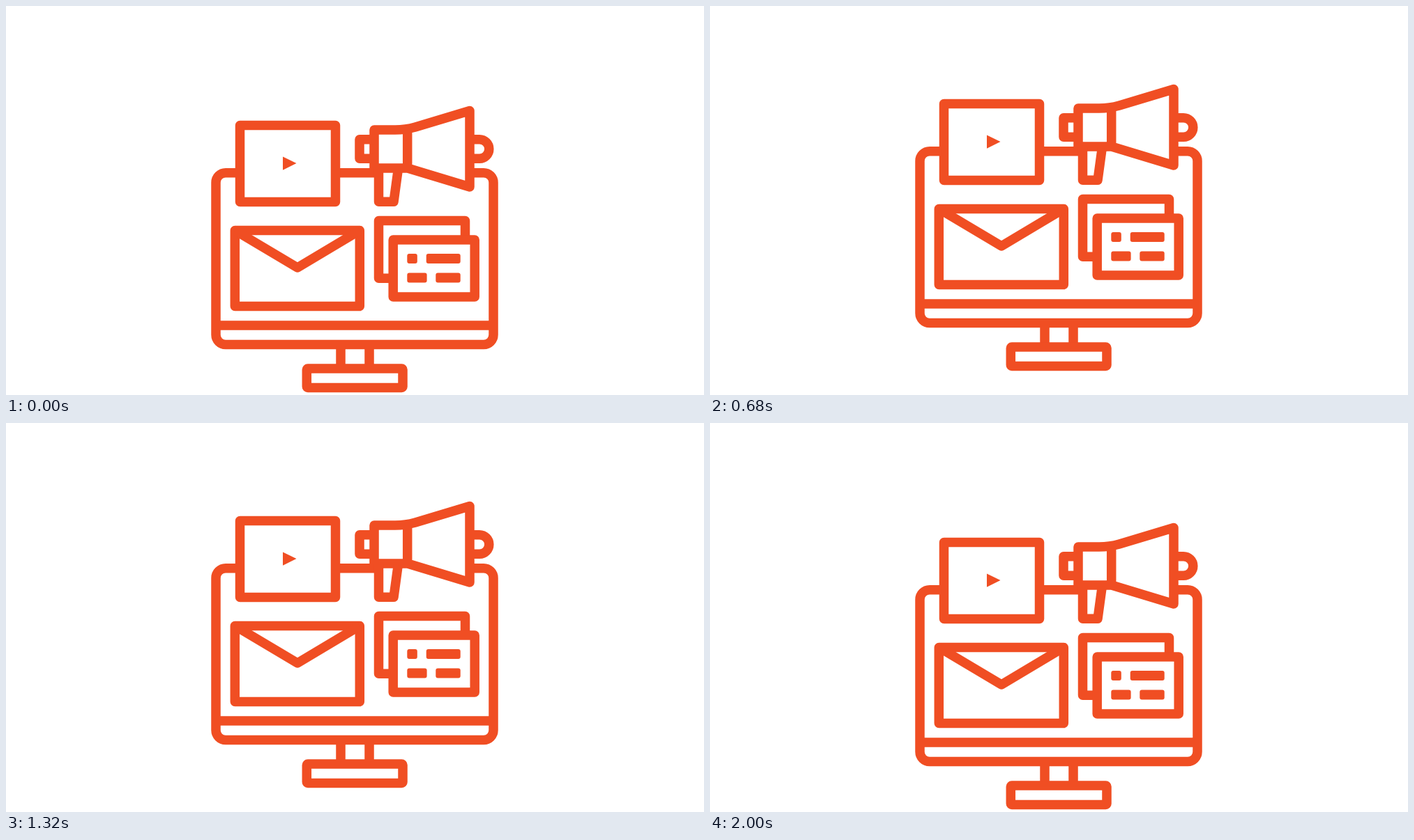
An HTML page that plays this animation: 1001x559 px, repeating every 2040 ms.

```html
<!DOCTYPE html>
<html lang="en">
<head>
<meta charset="utf-8">
<title>Online marketing</title>
<style>
  html, body { margin: 0; width: 100%; height: 100%; overflow: hidden; background: #fff; }
  svg { display: block; width: 1001px; height: 559px; }
  #icon { fill: none; stroke: #f04e23; stroke-width: 13.5; stroke-linejoin: round; }
  .solid { fill: #f04e23; stroke: none; }
</style>
</head>
<body>
<svg viewBox="0 0 1001 559">
  <g id="icon">
    <!-- monitor and stand -->
    <path d="M670 239.7H685a14 14 0 0 1 14 14V472.5a14 14 0 0 1 -14 14H315a14 14 0 0 1 -14 -14V253.7a14 14 0 0 1 14 -14H333M475 239.7H534M301 459H699"/>
    <path d="M480 488V520M521 488V520"/>
    <rect x="431.3" y="521" width="137.7" height="27.5" rx="1.5"/>

    <!-- video -->
    <rect x="335.5" y="171.5" width="137" height="110"/>
    <path class="solid" d="M397 216.5L416.5 226L397 235.7Z"/>

    <!-- megaphone -->
    <path d="M528 178H558Q573 178 587 174L665 150.5V260L576 233H528ZM575.7 177V233"/>
    <path d="M528 191.7H507V219.3H528M668 191.7H679a13.8 13.8 0 0 1 0 27.6H668"/>
    <path d="M534.5 234V281.3H556L562.3 235"/>

    <!-- envelope -->
    <rect x="328.3" y="322.5" width="179" height="109"/>
    <path d="M328.3 322.5L418 376L507.3 322.5"/>

    <!-- cards -->
    <path d="M553 391.3H534.5V308.5H658.5V334"/>
    <rect x="555.2" y="336" width="117" height="82"/>
    <g class="solid">
      <rect x="575.3" y="356" width="14.5" height="14" rx="3"/>
      <rect x="602.7" y="356" width="49" height="14" rx="3"/>
      <rect x="575.3" y="383.5" width="28.3" height="14" rx="3"/>
      <rect x="616.3" y="383.5" width="35.4" height="14" rx="3"/>
    </g>
  </g>
</svg>
<script>
  const LOOP = 2040, STEP = 40, HALF = 1000, RISE = 46;
  const icon = document.getElementById('icon');
  const start = performance.now();

  // Linear rise and fall, in steps of 40 ms and whole pixels.
  function draw() {
    const elapsed = (performance.now() - start) % LOOP;
    const time = Math.floor(elapsed / STEP) * STEP;
    const lift = Math.round(RISE * (1 - Math.abs(time - HALF) / HALF));
    icon.setAttribute('transform', `translate(0 ${-lift})`);
    requestAnimationFrame(draw);
  }
  draw();
</script>
</body>
</html>
```
